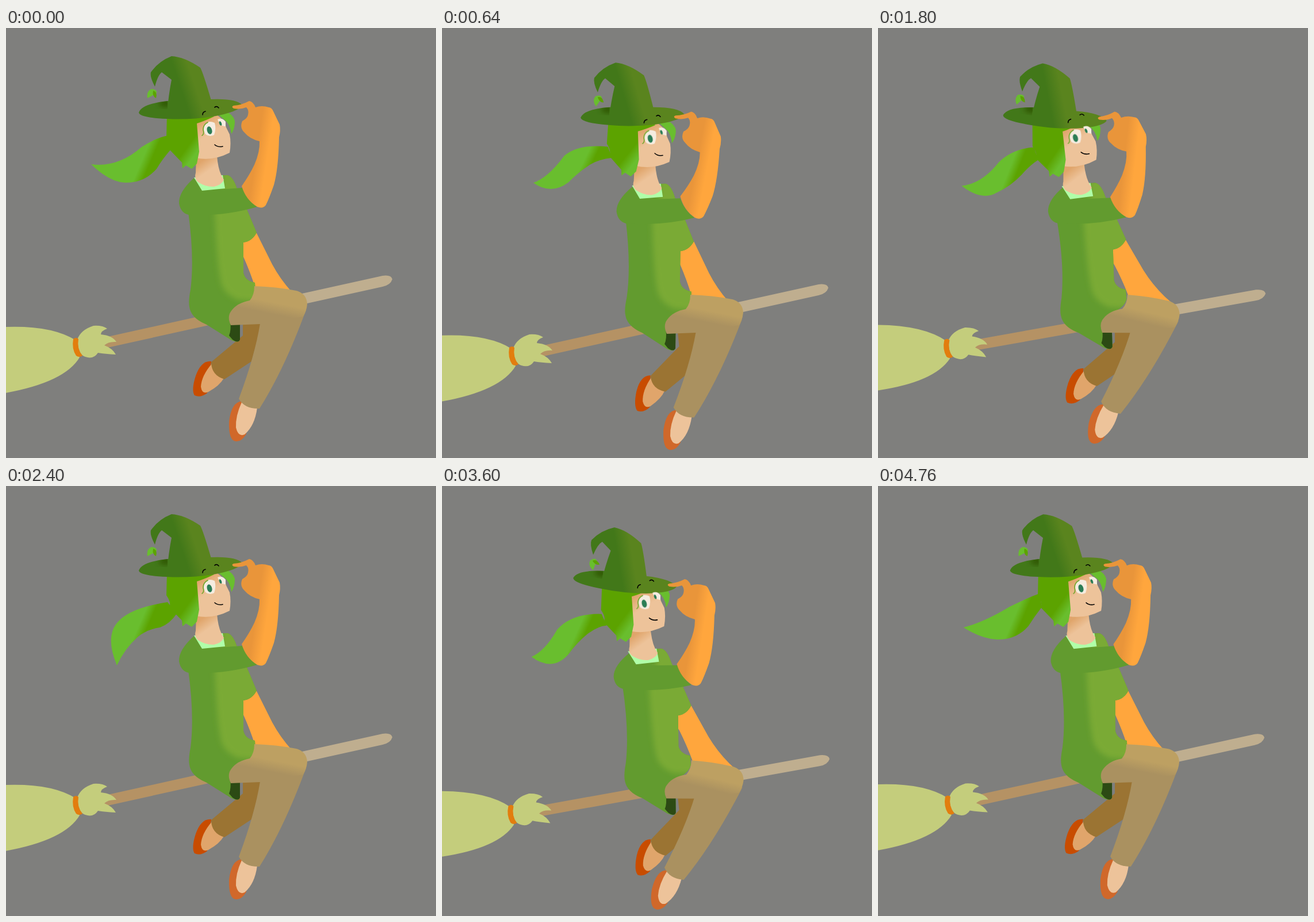
Animation, 748 px wide and 748 px high, one loop 4.8 s. Source, as an HTML page without scripts:

```html
<!DOCTYPE html>
<html lang="en">
<head>
<meta charset="utf-8">
<title>Witch on a broom</title>
<style>
@property --t { syntax: "<angle>"; inherits: true; initial-value: 0deg; }

html, body { margin: 0; width: 100%; height: 100%; overflow: hidden; background: #7f7f7d; }
svg { display: block; width: 100%; height: 100%; animation: sway 2.4s steps(60) infinite; }

@keyframes sway { to { --t: 360deg; } }

/* Each part swings as: lower-case * (1 - cos t) / 2 + upper-case * sin t */
.part {
  --x: 0; --X: 0; --y: 0; --Y: 0; --r: 0; --R: 0;
  --c: calc((1 - cos(var(--t))) / 2);
  --s: sin(var(--t));
  transform:
    translate(calc((var(--x) * var(--c) + var(--X) * var(--s)) * 1px),
              calc((var(--y) * var(--c) + var(--Y) * var(--s)) * 1px))
    rotate(calc((var(--r) * var(--c) + var(--R) * var(--s)) * 1deg));
}
.broom    { transform-origin: 400px 497px; --y: 27; --r: 2.3; --R: -1.27; }
.back-leg { transform-origin: 420px 530px; --y: 28; --Y: 2.5; --r: -6.3; --R: -2.5; }
.shin     { transform-origin: 490px 500px; --x: -.5; --y: 30.5; --Y: -.6; --r: 7.2; --R: -3.2; }
.torso    { transform-origin: 400px 480px; --x: -1; --X: .55; --y: 26.5; --Y: .4; --r: -.7; --R: 1.3; }
.back-arm { transform-origin: 436px 357px; --x: -2; --X: 3.6; --y: 26; --Y: .6; --r: -2.5; --R: 2.4; }
.sleeve   { transform-origin: 320px 305px; --x: -2.5; --X: 3.9; --y: 28; --Y: -.5; --r: 3.6; }
.forearm  { transform-origin: 440px 300px; --x: -1.7; --X: 4.4; --y: 35; --Y: -.3; --r: .3; --R: 2.2; }
.head     { transform-origin: 340px 215px; --x: -2.6; --X: 8.1; --y: 26.4; --Y: -.6; --r: .7; --R: 2.1; }
.hat      { transform-origin: 320px 141px; --x: -2.8; --X: 11.9; --y: 26.8; --Y: -2.4; --r: 9; --R: -2.7; }
.leaf     { transform-origin: 254px 114px; --x: 8; --X: 1.6; --y: 3; --r: -50; --R: -2.4; }

.eye { transform-box: fill-box; transform-origin: 50% 62%; animation: blink 4.8s linear infinite; }
@keyframes blink {
  0%, 60.8% { transform: none; }
  63.33% { transform: scaleY(.4); }
  64.6% { transform: scaleY(.08); }
  67.5%, 100% { transform: none; }
}

.tail { animation: wave 1.6s linear infinite; }
@keyframes wave {
  0%, 100% { d: path("M283 187Q262 190 236 207Q195 243 148 237Q180 268 207 269Q240 270 262 245Q272 228 287 211Z"); }
  25% { d: path("M280 197Q228 196 203 225Q183 262 159 273Q196 299 223 268Q239 246 256 232Q274 218 289 217Z"); }
  40% { d: path("M281 195Q230 192 206 214Q180 253 154 263Q186 284 215 260Q234 239 252 227Q265 218 289 214Z"); }
  50% { d: path("M281 202Q215 212 194 237Q172 262 193 312Q207 282 230 262Q246 249 268 246Q285 240 297 222Z"); }
  75% { d: path("M280 188Q253 220 218 225Q153 226 160 280Q178 265 208 264Q243 267 265 244Q278 229 286 210Z"); }
  90% { d: path("M281 185Q254 208 211 217Q148 218 154 270Q180 256 210 258Q245 259 264 237Q276 222 282 209Z"); }
}
</style>
</head>
<body>
<svg viewBox="0 0 748 748">
  <defs>
    <linearGradient id="handle" gradientUnits="userSpaceOnUse" x1="440" x2="460" y1="0" y2="0">
      <stop stop-color="#b59264"/><stop offset="1" stop-color="#bfae8f"/>
    </linearGradient>
    <linearGradient id="hatFill" gradientUnits="userSpaceOnUse" x1="304" y1="105" x2="328" y2="97">
      <stop stop-color="#427819"/><stop offset="1" stop-color="#5a841e"/>
    </linearGradient>
    <linearGradient id="tailFill" gradientUnits="userSpaceOnUse" x1="242" y1="217" x2="256" y2="223">
      <stop stop-color="#69be2e"/><stop offset="1" stop-color="#5ca300"/>
    </linearGradient>
    <linearGradient id="hairFill" gradientUnits="userSpaceOnUse" x1="311" y1="213" x2="326" y2="224">
      <stop stop-color="#5ca300"/><stop offset="1" stop-color="#69be2e"/>
    </linearGradient>
    <linearGradient id="faceFill" gradientUnits="userSpaceOnUse" x1="340" y1="163" x2="354" y2="185">
      <stop stop-color="#e0a56b"/><stop offset="1" stop-color="#edc39a"/>
    </linearGradient>
    <linearGradient id="neckFill" gradientUnits="userSpaceOnUse" x1="338" y1="233" x2="350" y2="250">
      <stop stop-color="#e0a56b"/><stop offset="1" stop-color="#edc39a"/>
    </linearGradient>
    <linearGradient id="armFill" gradientUnits="userSpaceOnUse" x1="438" y1="200" x2="458" y2="203">
      <stop stop-color="#e9953a"/><stop offset="1" stop-color="#ffa63d"/>
    </linearGradient>
    <linearGradient id="thighFill" gradientUnits="userSpaceOnUse" x1="464" y1="477" x2="460" y2="497">
      <stop stop-color="#bda062"/><stop offset="1" stop-color="#aa9160"/>
    </linearGradient>
    <filter id="soft" x="-30%" y="-30%" width="160%" height="160%"><feGaussianBlur stdDeviation="5"/></filter>
    <path id="shirt" d="M330 258L385 256Q395 258 402 280L420 318 436 356Q428 371 413 373V426Q416 440 433 443L434 460Q430 472 415 480L420 500 407 517V542Q404 549 392 543Q376 533 349 516Q322 505 319 485Q317 475 321 455Q328 400 317 320Z"/>
    <clipPath id="shirtClip"><use href="#shirt"/></clipPath>
    <clipPath id="brimClip"><path d="M231 147Q236 132 281 127V158Q232 156 231 147Z"/></clipPath>
  </defs>

  <g class="part broom">
    <path fill="url(#handle)" d="M168 539L655 431Q670 429 672 437Q669 447 655 450L172 557Z"/>
    <path fill="#c4cd7c" d="M-20 521Q75 514 121 543Q122 560 128 573Q100 620-20 638Z"/>
    <path fill="#c4cd7c" d="M124 542Q130 525 152 518Q168 517 176 523Q165 527 165 533Q185 535 192 546Q178 545 171 552Q185 557 191 568Q172 567 160 565Q152 577 138 572Q125 568 124 542Z"/>
    <path fill="#e27d0e" d="M117 541Q122 537 126 541Q123 558 133 570Q127 574 122 570Q114 558 117 541Z"/>
  </g>

  <g class="part back-leg">
    <path fill="#c84c00" d="M357 580Q340 578 330 605Q322 630 328 639Q338 644 350 635Z"/>
    <path fill="#e0a56b" d="M358 584Q340 605 339 624Q341 638 352 633Q372 622 379 609Z"/>
    <path fill="#9b7433" d="M412 535L357 581Q357 604 380 611L427 580 446 510 412 505Z"/>
  </g>

  <path class="part back-arm" fill="#ffa63d" d="M436 357L428 345H405V385L413 398Q425 425 433 450L440 472H510L497 459Q477 437 463 411Z"/>

  <g class="part torso">
    <use href="#shirt" fill="#629b2f"/>
    <g clip-path="url(#shirtClip)">
      <path fill="#7aaa34" filter="url(#soft)" d="M362 290Q366 415 375 446Q381 464 404 473L450 476V230H376V290Z"/>
    </g>
    <path fill="#2c4a14" d="M390 510H407V542Q404 549 394 542L388 535Q392 526 390 510Z"/>
  </g>

  <g class="part shin">
    <path fill="#d0682a" d="M411 649Q392 650 388 685Q387 718 400 719Q410 720 418 706Z"/>
    <path fill="#edc39a" d="M410 651Q399 675 400 695Q404 712 415 707Q433 692 437 660Z"/>
    <path fill="#aa9160" d="M442 514Q433 570 405 645Q415 663 441 662Q485 592 522 490L500 475 440 500Z"/>
  </g>

  <g class="part broom">
    <path fill="url(#thighFill)" d="M432 449Q470 450 505 457Q523 462 524 480Q523 492 517 502L442 515 391 517Q384 502 392 492Q402 478 424 474Q432 465 432 449Z"/>
  </g>

  <path class="part sleeve" fill="#629b2f" d="M327 261Q300 285 301 305Q304 322 318 325Q380 328 437 311Q420 300 411 278L341 283Z"/>

  <g class="part torso">
    <path fill="#b0ffa8" d="M327 260L341 283 381 279 377 256Z"/>
    <path fill="url(#neckFill)" d="M331 222L330 252Q327 262 334 268Q348 277 362 276Q375 273 379 264Q369 250 367 222Z"/>
  </g>

  <g class="part head">
    <path class="tail" fill="url(#tailFill)" d="M283 187Q262 190 236 207Q195 243 148 237Q180 268 207 269Q240 270 262 245Q272 228 287 211Z"/>
    <path fill="#69be2e" d="M366 148H388Q399 156 398 165Q397 178 392 184Q390 166 378 158Z"/>
    <path fill="url(#faceFill)" d="M330 160V226Q360 232 389 217Q392 200 389 185L383 173Q380 160 368 152L355 150Z"/>
    <path fill="url(#hairFill)" d="M280 150L279 190Q288 203 284 211L306 234 307 244 313 239 323 245 332 236 336 215 332 166Q345 162 362 154L350 148Z"/>
  </g>

  <g class="part hat">
    <path fill="url(#hatFill)" d="M231 147Q236 132 281 127L356 124Q400 122 411 134Q405 146 360 154Q320 160 280 158Q232 156 231 147Z"/>
    <g clip-path="url(#brimClip)">
      <ellipse cx="278" cy="131" rx="12" ry="6" fill="#2f5400" filter="url(#soft)"/>
    </g>
    <path fill="url(#hatFill)" d="M280 148Q283 115 288 90L271 77Q264 82 259 102Q250 85 252 77Q265 58 288 49Q310 50 338 69Q343 78 357 126L350 148Z"/>
    <g class="part leaf">
      <path fill="#69be2e" d="M246 122Q244 110 253 106Q263 107 262 113Q256 117 246 122Z"/>
      <path fill="#5ca300" d="M256 109Q264 111 261 122Q254 119 256 109Z"/>
    </g>
  </g>

  <g class="part head" fill="none" stroke-linecap="round">
    <g class="eye">
      <path fill="#f5ece0" d="M345 168Q352 160 363 165Q366 175 362 186Q355 190 347 185Q342 178 345 168Z"/>
      <ellipse cx="354" cy="178" rx="4.3" ry="7" transform="rotate(-15 354 178)" fill="#2b7d55"/>
      <path stroke="#6da526" stroke-width="1.6" d="M341 187Q345 185 343 177Q343 168 351 164"/>
    </g>
    <g class="eye">
      <path fill="#f5ece0" d="M368 159Q376 155 382 163V171Q373 172 368 159Z"/>
      <ellipse cx="373" cy="166" rx="2" ry="4" transform="rotate(-20 373 166)" fill="#2b7d55"/>
    </g>
    <g stroke="#000" stroke-width="1.6">
      <path d="M342 151Q342 146 347 145"/>
      <path d="M363 138Q367 135 370 139"/>
      <path d="M363 203Q369 208 377 206"/>
    </g>
  </g>

  <path class="part forearm" fill="url(#armFill)" d="M410 275Q424 255 432 238Q442 215 441 197Q424 193 415 182Q406 174 411 162Q420 157 421 151Q423 143 418 138Q408 142 396 140Q391 137 396 135Q410 134 423 127Q430 128 434 138Q445 134 457 138Q462 138 465 145L476 168Q478 178 475 190Q474 244 466 273Q458 296 452 308Q447 315 437 311Q417 299 410 275Z"/>
</svg>
</body>
</html>
```
